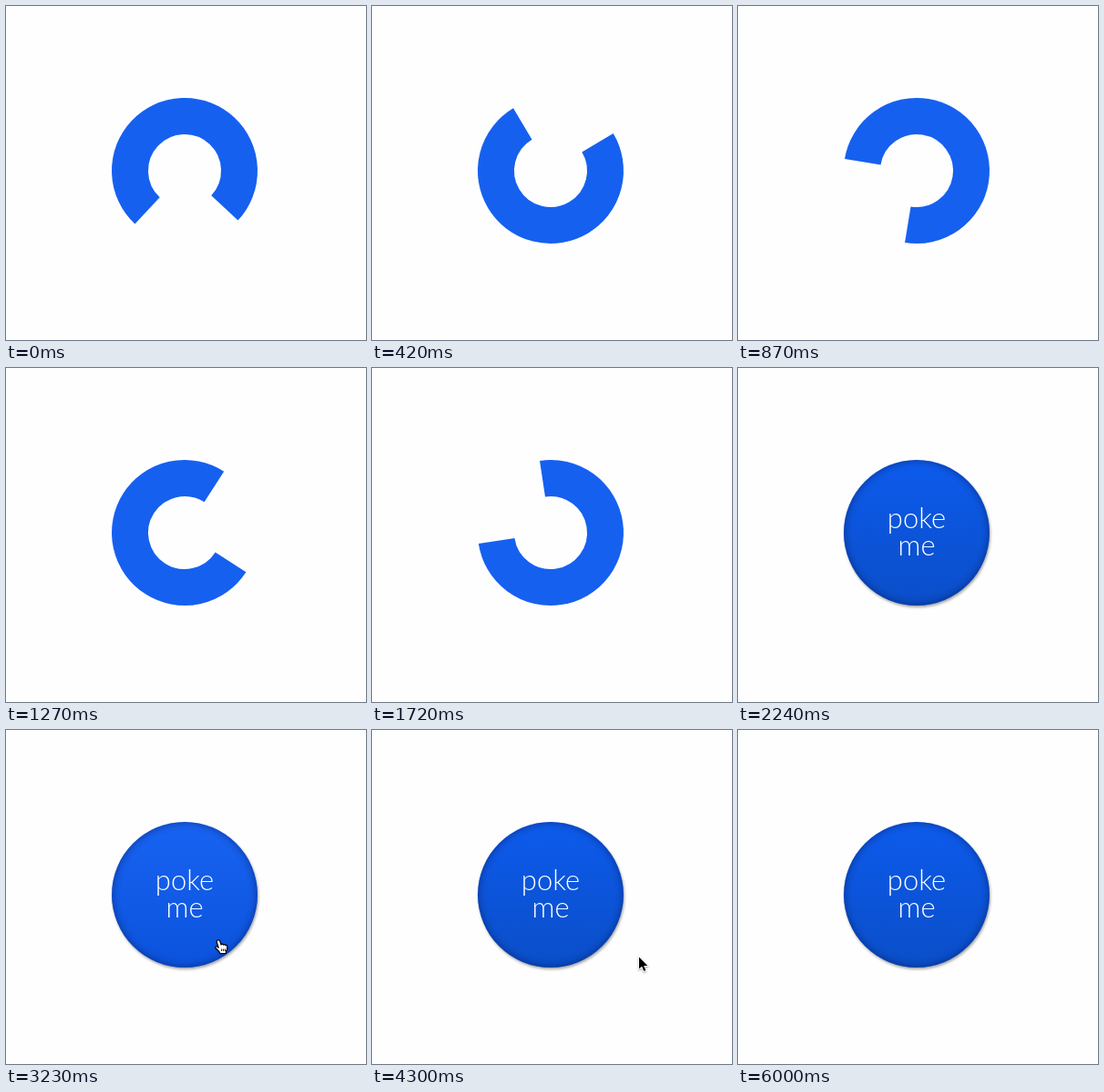
Animation of 395 by 367 pixels, one loop 6590 ms. Source, as an HTML page with a canvas:

```html
<!DOCTYPE html>
<html lang="en">
<head>
<meta charset="utf-8">
<title>Poke button</title>
<style>
  html, body { margin: 0; width: 100%; height: 100%; overflow: hidden; background: #fefefe; }
  canvas { display: block; }
</style>
</head>
<body>
<canvas id="stage" width="395" height="367"></canvas>
<script>
const ctx = document.getElementById('stage').getContext('2d');
const LOOP = 6590;
const CX = 196, CY = 181, R = 80;
const REST = [233, 232];

// Bursts of steps: first step, last step, number of steps
const spinBursts = [[60, 700, 12], [760, 1380, 12], [1440, 2060, 12], [2120, 2240, 3]];
const moves = [
  { burst: [2760, 3230, 9], from: [411, 287], to: REST, power: 1.5 },
  { burst: [3710, 3890, 4], from: REST, to: [309, 254], power: 1.3 },
  { burst: [4300, 4650, 7], from: [309, 254], to: REST, power: 1.53 },
  { burst: [5190, 5470, 6], from: REST, to: [346, 286], power: 1.4 },
  { burst: [5830, 5950, 3], from: [346, 286], to: [381, 348], power: 1 }
];
const CURSOR_GONE = 6000;

const arrow = new Path2D('M0 0V13.2L3.1 10.4L5.3 15.6L7.4 14.7L5.2 9.6H9.4Z');
const hand = new Path2D('M3.2 1C4.5 .2 5.6 1.2 6 2.6L7 6C7.6 4.8 9.2 5 9.5 6.2' +
  'C10 5.2 11.5 5.4 11.8 6.6C12.6 6 13.7 6.6 13.8 8L13.6 11L12.4 13.5V15.5H6' +
  'C5.5 13 2.5 11.5 .8 9.4C.2 8.2 1.8 7.2 3.2 8.4L4.2 9.2L2.2 3C2 2 2.4 1.3 3.2 1Z');
const knuckles = new Path2D('M7.6 10.5V13M9.6 10.5V13M11.4 10.5V13');

const lerp = (a, b, p) => a + (b - a) * p;
const stepTime = ([start, end, n], k) => Math.round((start + k * (end - start) / (n - 1)) / 10) * 10;

// Number of steps of a burst already taken at time t
function stepsTaken(burst, t) {
  let k = 0;
  while (k < burst[2] && stepTime(burst, k) <= t) k++;
  return k;
}

function heldTime(t) {
  let held = 0;
  for (const burst of spinBursts) {
    const k = stepsTaken(burst, t);
    if (k) held = stepTime(burst, k - 1);
  }
  return held;
}

function gapAngle(t) {
  return t < 870 ? lerp(88, 504.3, t / 870) : lerp(504.3, 936.4, (t - 870) / 850);
}

function cursorAt(t) {
  if (t < moves[0].burst[0] || t >= CURSOR_GONE) return null;
  const move = moves.filter(m => m.burst[0] <= t).pop();
  const p = 1 - Math.pow(1 - stepsTaken(move.burst, t) / move.burst[2], move.power);
  return move.from.map((v, i) => lerp(v, move.to[i], p));
}

function drawSpinner(t) {
  const gap = gapAngle(t) * Math.PI / 180;
  ctx.strokeStyle = '#1660f0';
  ctx.lineWidth = 40;
  ctx.beginPath();
  ctx.arc(CX, CY, 60, gap + Math.PI / 4, gap + Math.PI * 7 / 4);
  ctx.stroke();
}

function drawButton(hover) {
  const face = ctx.createLinearGradient(0, CY - R, 0, CY + R);
  face.addColorStop(0, hover ? '#1863f2' : '#0d5bec');
  face.addColorStop(1, hover ? '#0b53dc' : '#0a4ec8');
  const rim = ctx.createRadialGradient(CX, CY, R - 11, CX, CY, R);
  rim.addColorStop(0, 'rgba(0,10,60,0)');
  rim.addColorStop(0.5, 'rgba(0,10,60,.06)');
  rim.addColorStop(1, 'rgba(0,10,60,.25)');

  ctx.beginPath();
  ctx.arc(CX, CY, R, 0, Math.PI * 2);
  ctx.save();
  ctx.shadowColor = 'rgba(0,0,0,.35)';
  ctx.shadowBlur = 3;
  ctx.shadowOffsetX = 1;
  ctx.shadowOffsetY = 2;
  ctx.fillStyle = face;
  ctx.fill();
  ctx.restore();
  ctx.fillStyle = rim;
  ctx.fill();

  ctx.fillStyle = '#fff';
  ctx.font = '300 31px Lato, "Open Sans", sans-serif';
  ctx.textAlign = 'center';
  ctx.fillText('poke', CX, 175.5);
  ctx.fillText('me', CX, 205.5);
}

function drawCursor([x, y], pointing) {
  ctx.save();
  ctx.lineJoin = 'round';
  ctx.shadowColor = 'rgba(0,0,0,.35)';
  ctx.shadowBlur = 2;
  ctx.shadowOffsetY = 1;
  if (pointing) {
    ctx.translate(x - 4, y - 2);
    ctx.fillStyle = '#fff';
    ctx.fill(hand);
    ctx.shadowColor = 'transparent';
    ctx.strokeStyle = '#000';
    ctx.lineWidth = 1.2;
    ctx.stroke(hand);
    ctx.lineWidth = 0.9;
    ctx.stroke(knuckles);
  } else {
    ctx.translate(x, y);
    ctx.strokeStyle = '#fff';
    ctx.lineWidth = 2;
    ctx.stroke(arrow);
    ctx.shadowColor = 'transparent';
    ctx.fillStyle = '#000';
    ctx.fill(arrow);
  }
  ctx.restore();
}

function draw(t) {
  const fadeBurst = spinBursts[3];
  const shown = stepsTaken(fadeBurst, t) / fadeBurst[2];
  const cursor = cursorAt(t);
  const hover = cursor !== null && Math.hypot(cursor[0] - CX, cursor[1] - CY) < R;

  ctx.globalAlpha = 1;
  ctx.fillStyle = '#fefefe';
  ctx.fillRect(0, 0, 395, 367);
  if (shown < 1) drawSpinner(heldTime(t));
  if (shown > 0) {
    ctx.globalAlpha = shown;
    drawButton(hover);
  }
  if (cursor) drawCursor(cursor, hover);
}

const began = performance.now();
function tick() {
  draw((performance.now() - began) % LOOP);
  requestAnimationFrame(tick);
}
tick();
</script>
</body>
</html>
```
